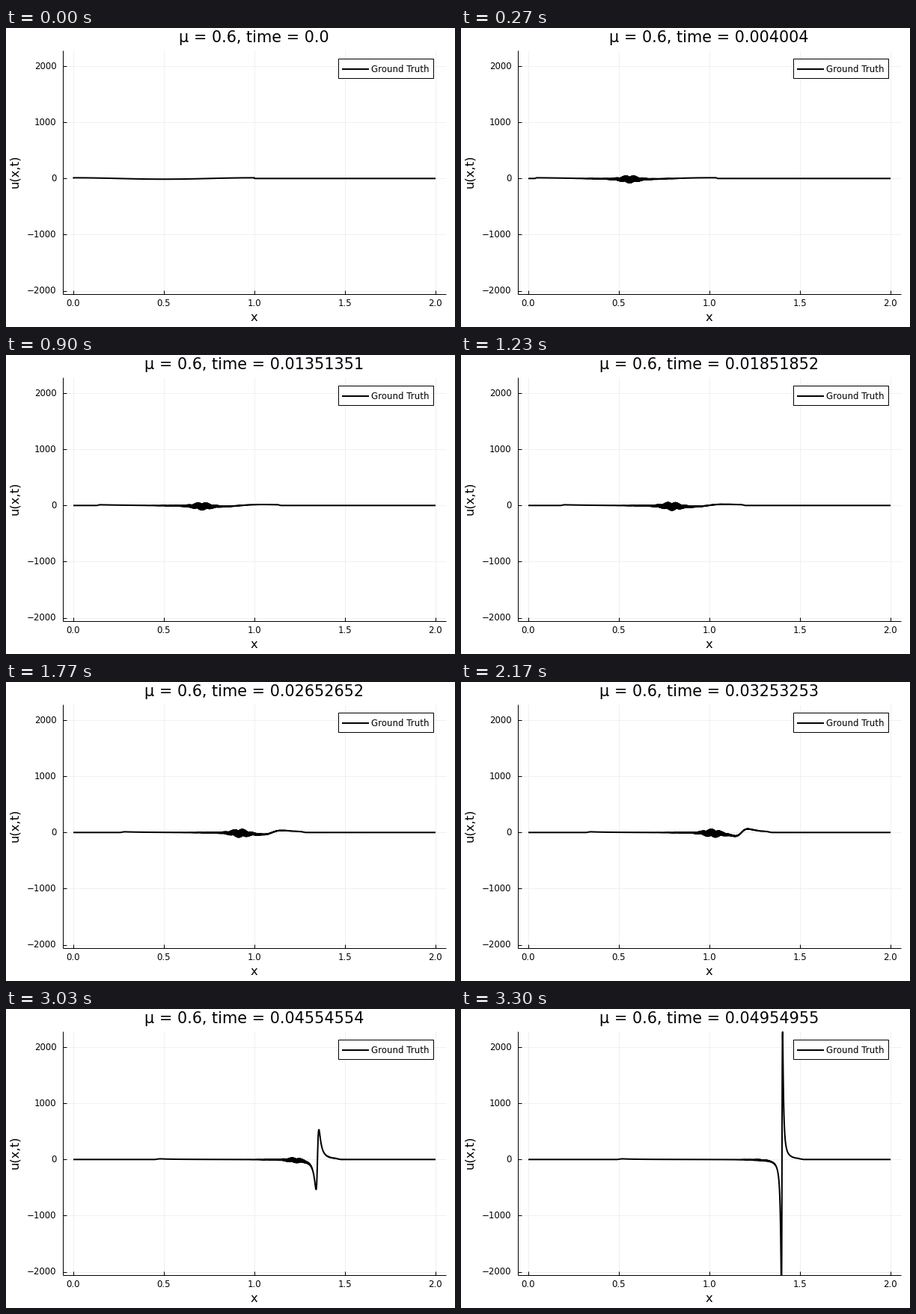
These frames come from a looping animation (600 px wide and 400 px high, 3330 ms). A matplotlib script:

```python
import numpy as np
import matplotlib.pyplot as plt
from matplotlib.animation import FuncAnimation
from matplotlib.patches import Rectangle

plt.rcParams["font.family"] = "DejaVu Sans"
plt.rcParams["path.simplify"] = False

W, H, DPI = 600, 400, 100
TICKS = 333                 # one loop in steps of 10 ms
STEP = 5.0050047e-4         # simulated time per picture
LEFT, RIGHT, TOP, BOTTOM = 75.5, 588, 30, 355.5
PT = 72 / DPI               # points per pixel

fig = plt.figure(figsize=(W / DPI, H / DPI), dpi=DPI, facecolor="white")
ax = fig.add_axes([0, 0, 1, 1])
ax.set_xlim(0, W)
ax.set_ylim(H, 0)
ax.axis("off")


def to_px(x):
    return 90 + 242 * x


def to_py(u):
    return 201.3 - 0.07515 * u


def line(xs, ys, width=1.0, color="black", z=2):
    return ax.plot(xs, ys, color=color, lw=width * PT, zorder=z,
                   solid_capstyle="butt", solid_joinstyle="round")[0]


def label(x, y, text, size, align="center", **kw):
    return ax.text(x, y, text, fontsize=size * PT, ha=align, va="baseline",
                   zorder=6, **kw)


# Axes, grid and ticks
for v in (0.0, 0.5, 1.0, 1.5, 2.0):
    px = to_px(v)
    line([px, px], [TOP, BOTTOM], color="#f0f0f0", z=1)
    line([px, px], [BOTTOM, BOTTOM - 5])
    label(px - 0.3, 371.7, f"{v:.1f}", 11.7)
for v in (-2000, -1000, 0, 1000, 2000):
    py = to_py(v)
    line([LEFT, RIGHT], [py, py], color="#f0f0f0", z=1)
    line([LEFT, LEFT + 5], [py, py])
    label(67.4, py + 3.6, str(v).replace("-", "\u2212"), 11.7, "right")
line([LEFT, LEFT], [TOP, BOTTOM + 0.5])
line([LEFT, RIGHT], [BOTTOM, BOTTOM])

label(331.4, 391.8, "x", 16.4)
label(16.3, 192.2, "u(x,t)", 16.4, rotation=90, rotation_mode="anchor")
title = label(331.6, 19, "", 20.8)

# Legend
ax.add_patch(Rectangle((443.5, 40.5), 127, 26, facecolor="white",
                       edgecolor="black", lw=PT, zorder=5))
line([449, 485], [54.5, 54.5], 2, z=6)
label(488.1, 58.8, "Ground Truth", 11.7, "left")

# Solution curve
x = np.linspace(0, 2, 2001)
index = np.arange(x.size)
start = np.linspace(0, 1, 6001)
curve = line(to_px(x), to_py(0 * x), 2, z=4)
curve.set_clip_path(Rectangle((LEFT, TOP), RIGHT - LEFT, BOTTOM - TOP,
                              transform=ax.transData))

KNOTS = [0, 0.004, 0.0085, 0.0185, 0.0265, 0.0325, 0.041, 0.0495]
AMPLITUDE = [0, 64, 58, 72, 72, 70, 76, 10]
DRIFT = [0, 0, -1, 0, -2.5, -8.5, -11, -12]


def wave(t):
    """Cosine carried along steepening characteristics."""
    steep = 18.35
    angle = 2 * np.pi * start
    pos = start + t * (13.13 - steep / (2 * np.pi) * np.cos(angle))
    height = 12.5 + 48 * t
    val = height * np.cos(angle) / (1 + steep * t * np.sin(angle)) ** 3
    u = np.interp(x, pos, val)
    blur = 0.0003 + 0.13 * np.sqrt(t)
    rise = np.clip((x - pos[0]) / blur + 0.5, 0, 1)
    fall = np.clip((pos[-1] - x) / blur + 0.5, 0, 1)
    u *= rise * fall
    u[0] = 0  # fixed boundary
    return u


def ripple(t):
    """Short-wave packet whose samples fall on three braided branches."""
    s = to_px(x) - to_px(0.495 + 16.05 * t)
    envelope = np.interp(t, KNOTS, AMPLITUDE) / (1 + np.abs(s / 13) ** 2.5)
    phase = 2 * np.pi * (s - np.interp(t, KNOTS, DRIFT)) / 39
    return -envelope * np.cos(2 * np.pi * index / 3 + phase)


def update(tick):
    # pictures change every 3, 4, 3 ticks
    t = int(0.3 * tick + 0.15) * STEP
    curve.set_ydata(to_py(wave(t) + ripple(t)))
    title.set_text(f"\u03bc = 0.6, time = {round(t, 8)}")
    return curve, title


anim = FuncAnimation(fig, update, frames=TICKS, interval=10,
                     repeat=True, repeat_delay=0)
plt.show()
```
